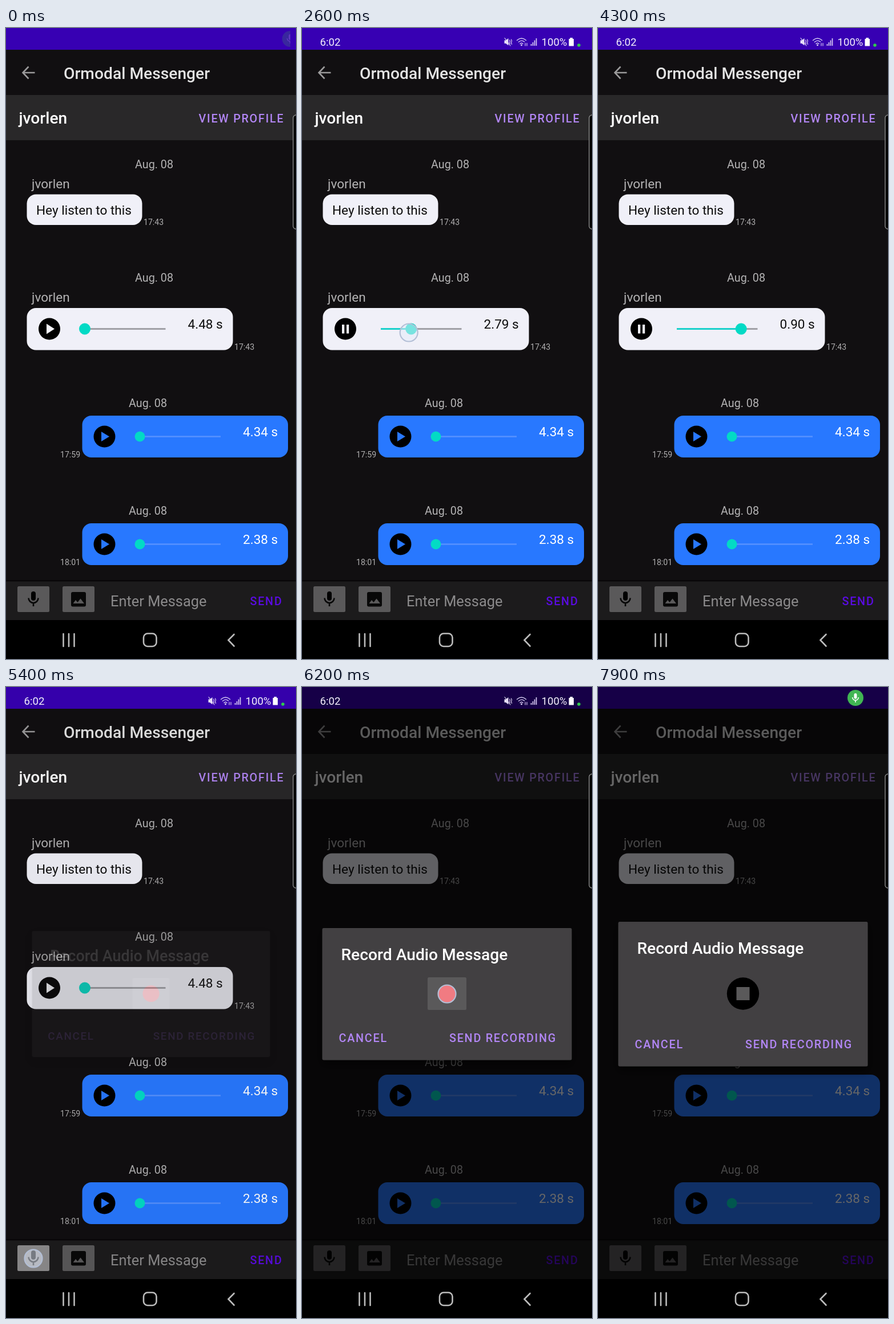
Recreate the animation shown at these times as an HTML page. Size 508x1102 px, loop 8 s.

```html
<!DOCTYPE html>
<html lang="en">
<head>
<meta charset="utf-8">
<title>Voice messages</title>
<style>
html, body { margin: 0; width: 100%; height: 100%; overflow: hidden; background: #000; }
svg { display: block; width: 508px; height: 1102px; font-family: Roboto, sans-serif; }
.h { font-size: 28.2px; font-weight: 500; }
.btn { font-size: 19.76px; font-weight: 500; letter-spacing: 1.76px; }
.date { font-size: 19.76px; fill: #b4b3b4; text-anchor: middle; }
.body { font-size: 22.58px; }
.time { font-size: 14.11px; fill: #b0afb0; }
.bar { font-size: 18.6px; fill: #f4f0fc; }
.line { fill: none; stroke-linecap: round; }
</style>
</head>
<body>
<svg viewBox="0 0 508 1102">
  <defs>
    <g id="mic">
      <rect x="-4" y="-13" width="8" height="16" rx="4"/>
      <path d="M-8.5-1.5a8.5 8.5 0 0 0 17 0M0 7.5V13" fill="none" stroke="currentColor" stroke-width="2.6"/>
    </g>
    <g id="voice">
      <rect x="133.500" y="677" width="360.500" height="73" rx="16" fill="#2878ff"/>
      <circle cx="172.500" cy="713.500" r="19" fill="#000"/>
      <path d="M167 705L181 713.500L167 722Z" fill="#2878ff"/>
      <path d="M234 713.500H376" stroke="#5792ff" stroke-width="2.600"/>
      <circle cx="234.500" cy="713.500" r="9" fill="#03dac5"/>
      <text class="date" x="248.500" y="661.500">Aug. 08</text>
    </g>
    <clipPath id="screen"><rect width="498" height="38"/></clipPath>
    <filter id="shadow" x="-10%" y="-10%" width="120%" height="130%">
      <feDropShadow dx="0" dy="7" stdDeviation="8" flood-color="#000" flood-opacity=".6"/>
    </filter>
  </defs>

  <rect width="508" height="1102" fill="#110f11"/>
  <rect width="508" height="38" fill="#3700b3"/>
  <path class="line" d="M50.500 78H30M39.500 67.500L29.500 78L39.500 88.500" stroke="#9b9a9b" stroke-width="2.600" style="stroke-linecap:butt"/>
  <text class="h" x="101" y="88.500" fill="#e3e3e3">Ormodal Messenger</text>
  <rect y="117" width="508" height="79" fill="#292829"/>
  <text class="h" x="22.500" y="167" fill="#fff">jvorlen</text>
  <text class="btn" x="337.500" y="164.500" fill="#b286f5">VIEW PROFILE</text>

  <text class="date" x="259.500" y="244.500">Aug. 08</text>
  <text class="body" x="45" y="280" fill="#b4b3b4">jvorlen</text>
  <rect x="36.500" y="290.500" width="202" height="53.500" rx="16" fill="#f0f0f8"/>
  <text class="body" x="53" y="326" fill="#0c0c0c">Hey listen to this</text>
  <text class="time" x="241" y="344">17:43</text>

  <text class="date" x="259.500" y="443">Aug. 08</text>
  <text class="body" x="45" y="478" fill="#b4b3b4">jvorlen</text>
  <rect x="36.500" y="489" width="361" height="73.500" rx="16" fill="#f0f0f8"/>
  <circle cx="76" cy="525.500" r="19" fill="#000"/>
  <path id="glyph" fill="#f4f4fa"/>
  <path d="M138 525.500H279.500" stroke="#a0a0a6" stroke-width="2.800"/>
  <path id="played" stroke="#1bd0cb" stroke-width="2.800"/>
  <circle id="thumb" cy="525.500" r="10" fill="#03dac5"/>
  <text id="left" class="body" x="318.500" y="524.500" fill="#0c0c0c"></text>
  <text class="time" x="400" y="562">17:43</text>

  <use href="#voice"/>
  <text class="body" x="415" y="712.500" fill="#fff">4.34 s</text>
  <text class="time" x="95" y="750">17:59</text>
  <use href="#voice" y="188"/>
  <text class="body" x="415" y="900.500" fill="#fff">2.38 s</text>
  <text class="time" x="95" y="938">18:01</text>

  <rect y="964" width="508" height="70" fill="#1c1b1c"/>
  <rect y="964" width="508" height="2.500" fill="#080708"/>
  <g fill="#5a595a">
    <rect x="20" y="975" width="56" height="45" rx="2.500"/>
    <rect x="99" y="975" width="56" height="45" rx="2.500"/>
  </g>
  <rect id="lit" x="20" y="975" width="56" height="45" rx="2.500" fill="#fff"/>
  <use href="#mic" x="48" y="997" color="#080808"/>
  <rect x="114" y="985" width="26" height="25.500" rx="3" fill="#080808"/>
  <path d="M117.500 1005L122 999L125.500 1003L130.500 996.500L137 1005Z" fill="#5a595a"/>
  <text x="183" y="1010" font-size="25.400" fill="#8b8a8b">Enter Message</text>
  <text class="btn" x="427.500" y="1008" fill="#5a0be2">SEND</text>

  <rect id="dim" width="508" height="1034"/>

  <g id="dialog">
    <rect id="card" x="35.500" width="437" rx="2.500" fill="#424142" filter="url(#shadow)"/>
    <text id="head" class="h" x="68.500" fill="#fff">Record Audio Message</text>
    <g id="rec">
      <rect x="220" y="507" width="68" height="57" rx="2.500" fill="#5a595a"/>
      <circle cx="254" cy="535.500" r="15.300" fill="#f00"/>
    </g>
    <g id="stop">
      <circle cx="254" cy="535.500" r="28.200"/>
      <rect x="242.500" y="524" width="23" height="23" fill="#5a595a"/>
    </g>
    <g id="acts" class="btn" fill="#b286f5">
      <text x="64.500">CANCEL</text>
      <text x="258">SEND RECORDING</text>
    </g>
  </g>

  <rect x="503" y="152" width="16" height="199" rx="5" fill="#000" stroke="#858585" stroke-width="1.500"/>

  <rect y="1034" width="508" height="68"/>
  <g class="line" stroke="#bcbcbc" stroke-width="2.600">
    <path d="M100.500 1058V1080M110 1058V1080M119.500 1058V1080"/>
    <rect x="241" y="1057.500" width="22.500" height="22.500" rx="7"/>
    <path d="M399.500 1059L389.500 1069L399.500 1079.500"/>
  </g>

  <g id="status">
    <text class="bar" x="31.500" y="30.500">6:02</text>
    <text class="bar" x="419.500" y="30.500">100%</text>
    <path d="M354.500 21.500H357L361.500 18V30.500L357 27H354.500Z" fill="#e6def8"/>
    <path class="line" d="M355 17.500L365 31M363.500 21L364.500 23L363.500 25.500L364.500 28M366.500 20L367.500 22.500L366.500 25.500L367.500 28.500" stroke="#e6def8" stroke-width="1.100"/>
    <g class="line" stroke="#d8ccf4" stroke-width="1.400">
      <path d="M376.500 21.500Q384.500 14.500 392.500 21.500M379.500 24.500Q384.500 20 389.500 24M382 27.500Q384.500 25 387 27.500"/>
      <path d="M391 31V26.500M394 26.500V31" stroke-width="1.200"/>
    </g>
    <circle cx="384.500" cy="29.800" r="1.500" fill="#d8ccf4"/>
    <path d="M401.500 31V28M404.500 31V25M407.500 31V21.500M410.500 31V18" stroke="#d8ccf4" stroke-width="1.700"/>
    <path d="M469.500 17H474V19H476V31.500H467.500V19H469.500Z" fill="#fff"/>
  </g>
  <circle id="dot" cx="485" cy="30" r="2.800" fill="#2fcb4c"/>
  <g clip-path="url(#screen)">
    <g id="chip">
      <circle r="14" fill="#41b653"/>
      <use id="chipMic" href="#mic" transform="scale(.62)" color="#fff" fill="#fff"/>
    </g>
  </g>

  <g id="touch">
    <circle r="15.500" fill="#e4ebfa" fill-opacity=".52" stroke="#b3bfd6" stroke-width="2.200"/>
  </g>
</svg>
<script>
const LOOP = 8000, STEP = 100, LENGTH = 4.48;
const el = {};
document.querySelectorAll('svg [id]').forEach(n => el[n.id] = n);

const set = (node, attrs) => { for (const k in attrs) node.setAttribute(k, attrs[k]); };
const show = (node, on) => set(node, { opacity: +on });
const clamp = v => Math.max(0, Math.min(1, v));
const mix = (a, b, p) => a + (b - a) * p;
const easeOut = p => 1 - (1 - p) ** 3;

// Piecewise linear value from [time, value] pairs
function at(keys, t) {
  if (t <= keys[0][0]) return keys[0][1];
  for (let i = 1; i < keys.length; i++) {
    const [t0, a] = keys[i - 1], [t1, b] = keys[i];
    if (t <= t1) return mix(a, b, (t - t0) / (t1 - t0));
  }
  return keys[keys.length - 1][1];
}

const PLAYED = [[936, 0], [2600, 1.69], [2700, 2.6], [3000, 3.7], [3300, 2.93],
                [3650, 2.93], [4300, 3.58], [5200, LENGTH]];
const STATUS = [[2200, 0], [2500, 1], [6400, 1], [6550, 0]];
const DIM = [[5380, 0], [5670, .6]];
const LIT = [[5390, 0], [5400, .3], [5600, .19], [5800, 0]];
const DRAG_Y = [[2600, 532], [3300, 547]];
const PAUSE = 'M70 518H74.200V533.500H70ZM78 518H82.200V533.500H78Z';
const PLAY = 'M71 516.500L85 525.500L71 534.500Z';

const TAPS = [
  { from: 780, to: 1000, x: 76, y: 526 },
  { from: 2480, to: 3350, drag: true },
  { from: 3580, to: 3760, x: 80, y: 526 },
  { from: 5380, to: 5560, x: 48, y: 998 },
  { from: 6180, to: 6360, x: 254, y: 536 }
];

function drawPlayer(t) {
  const done = t >= 5200;
  const sec = done ? 0 : at(PLAYED, t);
  const x = 138 + 141 * sec / LENGTH;
  const playing = t >= 936 && !done && (t < 2700 || t >= 3650);
  set(el.glyph, { d: playing ? PAUSE : PLAY });
  set(el.played, { d: `M138 525.500H${x}` });
  set(el.thumb, { cx: x });
  el.left.textContent = (LENGTH - sec).toFixed(2) + ' s';
  return x;
}

function drawTouch(t, thumbX) {
  const tap = TAPS.find(p => t >= p.from && t < p.to);
  show(el.touch, false);
  if (!tap) return;
  const x = tap.drag ? thumbX - 4 : tap.x;
  const y = tap.drag ? at(DRAG_Y, t) : tap.y;
  set(el.touch, { transform: `translate(${x} ${y})`, opacity: clamp((tap.to - t) / 100) });
}

function drawStatus(t) {
  show(el.dot, t >= 2200 && t < 6450);
  set(el.status, { opacity: at(STATUS, t) });
  const p = clamp((t - (t < 4000 ? -60 : 6500)) / 400);
  const out = t < 4000 ? clamp((t - 1850) / 350) : 0;
  const x = mix(mix(501, 451, easeOut(p * p)), 485, out);
  const y = mix(19, 30, out);
  const seen = (t < 2200 || t > 6500) ? clamp(p * 1.4) : 0;
  set(el.chip, { transform: `translate(${x} ${y}) scale(${mix(1, .2, out)})`, opacity: seen });
  set(el.chipMic, { opacity: 1 - out });
}

function drawDialog(t) {
  set(el.dim, { opacity: at(DIM, t) });
  set(el.lit, { opacity: at(LIT, t) });
  const p = clamp((t - 5360) / 242);
  const s = mix(.92, 1, easeOut(p));
  set(el.dialog, { opacity: p, transform: `translate(254 536) scale(${s}) translate(-254 -536)` });

  const stopping = t >= 6300;
  const shift = stopping && t < 6800 ? 1 : 0;
  const top = stopping ? 410 + shift : 421;
  const height = stopping ? 252.5 : 230.5;
  set(el.card, { y: top, height });
  set(el.head, { y: top + 55.5 });
  show(el.rec, !stopping);
  show(el.stop, stopping);
  set(el.stop, { transform: `translate(0 ${shift})` });
  set(el.acts, { transform: `translate(0 ${top + height - 32})` });
}

function draw(now) {
  const t = Math.floor(now % LOOP / STEP) * STEP;
  drawTouch(t, drawPlayer(t));
  drawStatus(t);
  drawDialog(t);
}

function tick() {
  draw(performance.now());
  requestAnimationFrame(tick);
}
tick();
</script>
</body>
</html>
```
